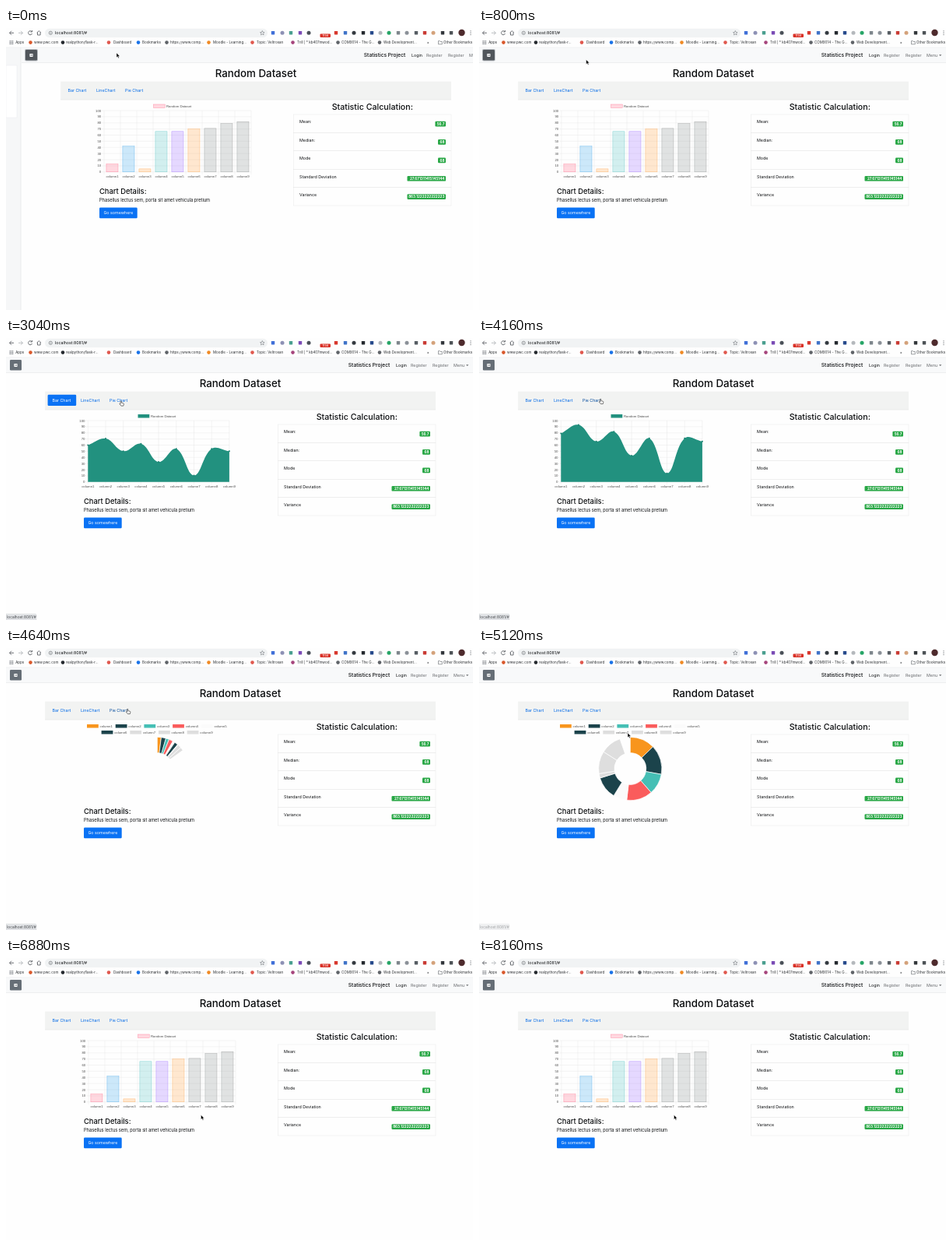
Write an HTML page that moves like this. It is 600x362 px and loops after 8.32 s.

```html
<!DOCTYPE html>
<html lang="en">
<head>
<meta charset="utf-8">
<title>Random Dataset</title>
<style>
  html, body { margin: 0; width: 100%; height: 100%; overflow: hidden; background: #fefefe; }
  svg { display: block; width: 100vw; height: 100vh; }
  text { font-family: Inter, Roboto, sans-serif; font-size: 5.33px; fill: #0c0e10; }
  .h1 { font-size: 13.33px; font-weight: 500; }
  .h2 { font-size: 10.67px; font-weight: 500; }
  .h3 { font-size: 9.33px; font-weight: 500; }
  .body { font-size: 5.68px; }
  .brand { font-size: 6.67px; font-weight: 500; }
  .mute { fill: #67696c; }
  .link { fill: #0069e6; }
  .link.dark { fill: #004a9c; }
  .link.active, .white { fill: #fff; }
  .badge { font-size: 4.55px; font-weight: 700; fill: #fff; text-anchor: end; }
  .chart text { font-family: "Liberation Sans", Arial, sans-serif; font-size: 4.3px; fill: #4a4a4a; }
  .chart .mid { text-anchor: middle; }
  .chart .end { text-anchor: end; }
  .grid { stroke: #e3e4e4; stroke-width: .4; fill: none; }
  .bookmarks text { font-size: 4.5px; fill: #2d3033; }
  .icon { fill: none; stroke: #5f6368; stroke-width: .9; }
</style>
</head>
<body>
<svg viewBox="0 0 600 362" preserveAspectRatio="none">
  <rect width="600" height="362" fill="#fefefe"/>

  <g id="page">
    <rect x="-20" y="25" width="20" height="337" fill="#f6f7f8"/>
    <rect x="-20" y="48" width="14" height="67" fill="#fff" stroke="#e6e7e8" stroke-width=".4"/>
    <path d="M-1.2 25V362" class="grid"/>
    <rect y="25" width="620" height="19.5" fill="#f8f9fa"/>
    <path d="M0 44.5H620" stroke="#dfe1e3" stroke-width=".5"/>
    <rect id="ring" x="4" y="27" width="17" height="15.6" rx="2" fill="#b9bdc1"/>
    <rect id="toggle" x="5" y="28" width="15" height="13.6" rx="1.3"/>
    <rect x="10.4" y="32.9" width="4.2" height="4" rx=".6" fill="#fff"/>
    <path d="M11.2 34.9h2.5m-.9-.9l.9.9-.9.9" fill="none" stroke="#545b62" stroke-width=".6"/>
    <text class="brand" x="439.8" y="37.4">Statistics Project</text>
    <text x="501" y="37.2">Login</text>
    <text class="mute" x="520" y="37.2">Register</text>
    <text class="mute" x="548" y="37.2">Register</text>
    <text class="mute" x="575" y="37.2">Menu</text>
    <path d="M591 34.2h3.4l-1.7 1.8z" fill="#67696c"/>

    <text class="h1" x="301" y="62.6" text-anchor="middle">Random Dataset</text>
    <rect x="50.2" y="68.6" width="501.8" height="23.4" fill="#f2f3f2"/>
    <path d="M50 92H552" stroke="#dcdddd" stroke-width=".5"/>
    <rect id="pill" x="53.6" y="72.8" width="36.6" height="14.2" rx="1.3" fill="#0a72f4"/>
    <text class="link" id="barTab" x="59.5" y="82">Bar Chart</text>
    <text class="link" id="lineTab" x="96" y="82">LineChart</text>
    <text class="link" id="pieTab" x="133" y="82">Pie Chart</text>

    <g class="chart" id="bar"></g>
    <g class="chart" id="line"></g>
    <g class="chart" id="pie"></g>

    <text class="h3" x="100" y="212.6">Chart Details:</text>
    <text class="body" x="100" y="222.5">Phasellus lectus sem, porta sit amet vehicula pretium</text>
    <rect x="100" y="230.5" width="48.7" height="13.7" rx="1.3" fill="#0a72f4"/>
    <text class="white" x="124.4" y="239.4" text-anchor="middle">Go somewhere</text>

    <text class="h2" x="450.8" y="105.3" text-anchor="middle">Statistic Calculation:</text>
    <g id="stats"></g>
  </g>

  <g id="chrome">
    <rect width="600" height="25" fill="#fefefe"/>
    <path d="M0 25H600" stroke="#e4e6e8" stroke-width=".5"/>
    <rect x="50" y=".8" width="286" height="11.4" rx="5.7" fill="#f1f3f4"/>
    <path class="icon" d="M10 6.3H4.6M7 3.8L4.5 6.3 7 8.8"/>
    <path class="icon" d="M16 6.3h5.4M19 3.8l2.5 2.5L19 8.8" style="stroke:#b5b8bb"/>
    <path class="icon" d="M33 4.6A2.5 2.5 0 1 0 33.5 7M33.6 3v2h-2"/>
    <path class="icon" d="M39.6 6.2L42.3 3.7 45 6.2M40.5 5.8V9h3.6V5.8"/>
    <circle class="icon" cx="57.3" cy="6.3" r="2.1" style="stroke-width:.6"/>
    <path class="icon" d="M57.3 6v1.4M57.3 4.9v.5" style="stroke-width:.6"/>
    <text x="63" y="8.3" style="font-size:5.25px">localhost:8081/#</text>
    <path class="icon" d="M329.3 3.5l.8 1.9 2 .2-1.5 1.3.5 2-1.8-1.1-1.8 1.1.5-2-1.5-1.3 2-.2z" style="stroke-width:.5"/>
    <g id="extensions"></g>
    <rect x="403.5" y="7.4" width="13.5" height="4.6" rx="1" fill="#d93025"/>
    <text class="white" x="410.2" y="11.1" text-anchor="middle" style="font-size:4px">1156</text>
    <g class="bookmarks" id="bookmarks"></g>
  </g>

  <g id="status">
    <path d="M0 354.2H37.5q1.5 0 1.5 1.5V362H0z" fill="#e3e5e8" stroke="#c9cccf" stroke-width=".4"/>
    <text x="1.2" y="360.2" style="font-size:4.8px;fill:#44474a">localhost:8081/#</text>
  </g>

  <g id="pointer">
    <path id="arrow" d="M0 0V5.8L1.4 4.6 2.3 6.7 3.3 6.3 2.4 4.2H4.2z" fill="#000" stroke="#fff" stroke-width=".4"/>
    <path id="hand" d="M.6.6Q1.3 0 1.9.7V2.7L4.4 3.3Q5 3.6 4.8 4.6L4.3 6.6H1.4L-.6 4.2Q-.6 3.3.6 4z" fill="#fff" stroke="#111" stroke-width=".55"/>
  </g>
</svg>

<script>
const LOOP = 8320, STEP = 160;
const TOP = 106, BASE = 184.8;
const BAR_START = 5280, LINE_START = 2740, PIE_START = 4600;
const $ = id => document.getElementById(id);
const add = (id, html) => $(id).insertAdjacentHTML('beforeend', html);
const rect = (x, y, w, h, attrs) => `<rect x="${x}" y="${y}" width="${w}" height="${h}" ${attrs}/>`;
const label = (x, y, s, cls = '') => `<text x="${x}" y="${y}" class="${cls}">${s}</text>`;
const yOf = v => BASE - v * (BASE - TOP) / 100;

// Browser extension buttons: x, colour
[[343, '#3f6fd8'], [355, '#8d91b5'], [366, '#4a9f8f'], [378, '#7a4bb5'], [389, '#4a5058'],
 [424, '#d8382e'], [436, '#3f73c8'], [447, '#343a40'], [459, '#24292e'], [470, '#274a8c'],
 [481, '#b4b8bc'], [492, '#27a567'], [504, '#7e868c'], [515, '#8b9198'], [527, '#565d63'],
 [538, '#c93b34'], [549, '#d4a27b'], [561, '#33373b'], [572, '#4d5256']
].forEach(([x, c], i) => add('extensions', i % 3 == 1 || x == 492
  ? `<circle cx="${x}" cy="6.2" r="2.5" fill="${c}"/>`
  : rect(x - 2.2, 4, 4.4, 4.4, `rx=".6" fill="${c}"`)));
add('extensions', '<circle cx="585.5" cy="6" r="4.2" fill="#4d2a2c"/>');
for (const y of [3.8, 6.2, 8.6]) add('extensions', `<circle cx="597" cy="${y}" r=".6" fill="#5f6368"/>`);

// Bookmarks: icon x, colour, caption x, caption
[[31.5, '#d9582b', 36, 'www.pwc.com'], [73, '#24292e', 77, 'realpython/flask-r...'],
 [132, '#e0584e', 138, 'Dashboard'], [170, '#1a73e8', 175, 'Bookmarks'],
 [206.5, '#5f6368', 211, 'https://www.comp...'], [260.5, '#f08a24', 266, 'Moodle - Learning...'],
 [316.5, '#e0584e', 322, 'Topic: Veltrosan'], [368.5, '#a6447c', 374, 'Trill | * kb407mwod...'],
 [426.5, '#5f6368', 431, 'COM9014 - The G...'], [480, '#5f6368', 485, 'Web Development...']
].forEach(([x, c, tx, s]) => add('bookmarks',
  `<circle cx="${x}" cy="18.6" r="2.3" fill="${c}"/>` + label(tx, 20.3, s)));
for (let i = 0; i < 9; i++)
  add('bookmarks', rect(4.5 + i % 3 * 1.8, 16.2 + (i / 3 | 0) * 1.8, 1.2, 1.2, 'fill="#7b7f84"'));
add('bookmarks', label(12.2, 20.3, 'Apps') + label(541, 20.3, '»') + label(562, 20.3, 'Other Bookmarks') +
  '<path class="icon" d="M555.5 16.6h1.8l.6.8h2.4v3.4h-4.8z" style="stroke-width:.6"/>');

// Statistics list
[['Mean:', '56.7', 13.6], ['Median:', '68', 10], ['Mode', '68', 10],
 ['Standard Deviation', '27.671311415145144', 49.5], ['Variance', '863.1222222222223', 49.5]
].forEach(([name, value, w], i) => {
  const y = 111 + i * 23.4;
  add('stats', rect(349.5, y, 202.5, 23.4, 'class="grid"') + label(357, y + 11.4, name) +
    rect(545 - w, y + 8.7, w, 6.7, 'rx="1.2" fill="#28a745"') + label(543.4, y + 13.7, value, 'badge'));
});

// Axes shared by the bar and line charts
function axes(id, left, right, step) {
  let d = '', s = '';
  for (let v = 0; v <= 100; v += 10) {
    d += `M${left - 3.3} ${yOf(v)}H${right}`;
    s += label(left - 3.8, yOf(v) + 1.5, v, 'end');
  }
  for (let x = left; x < right + 1; x += step) d += `M${x} ${TOP}V${BASE + 3.3}`;
  add(id, `<path class="grid" d="${d}"/>` + s);
}
const legend = (id, attrs) => add(id, rect(169.5, 98, 14.8, 4.5, attrs) + label(186, 102, 'Random Dataset'));

// Bar chart
const barValues = [13, 42, 5, 66, 66, 70, 71, 79, 82];
const barColors = ['#ff6384', '#36a2eb', '#ff9f40', '#4bc0c0', '#9966ff', '#ff9f40', '#858b8b', '#858b8b', '#858b8b'];
const tint = c => `fill="${c}" fill-opacity=".25" stroke="${c}" stroke-width=".45" stroke-opacity=".7"`;
axes('bar', 106, 295, 21);
legend('bar', tint(barColors[0]));
barValues.forEach((v, i) => add('bar',
  rect(108.9 + 21 * i, 0, 15.1, 0, 'class="col" ' + tint(barColors[i])) +
  label(116.5 + 21 * i, 192.3, 'column' + (i + 1), 'mid')));
add('bar', '<path id="tip" d="M179.5 132.5l2-1.5V126.5q0-1 1-1H230q1 0 1 1V138.5q0 1-1 1H182.5q-1 0-1-1V134z" fill="#000"/>');
const cols = document.querySelectorAll('.col');

function drawBars(k) {
  cols.forEach((c, i) => {
    const y = yOf(barValues[i] * k);
    c.setAttribute('y', y);
    c.setAttribute('height', BASE - y);
  });
}

// Line chart
const values = [79, 93, 66, 82, 43, 71, 14, 71, 66];
const TEAL = '#22917f';
axes('line', 105.3, 287, 22.7);
legend('line', `fill="${TEAL}"`);
add('line', `<path id="area" fill="${TEAL}"/><path id="dots" fill="none" stroke="#1b8271" stroke-width="2" stroke-linecap="round"/>`);
values.forEach((v, i) => add('line', label(105.3 + 22.7 * i, 192.3, 'column' + (i + 1), 'mid')));

function drawLine(k) {
  const pts = values.map((v, i) => [105.3 + 22.7 * i, yOf(v * k)]);
  const dist = (a, b) => Math.hypot(a[0] - b[0], a[1] - b[1]);
  const clampY = y => Math.min(BASE, Math.max(TOP, y));
  const handles = pts.map((p, i) => {
    const a = pts[i - 1] || p, b = pts[i + 1] || p;
    const da = dist(a, p), db = dist(p, b);
    const at = f => [p[0] + f * (b[0] - a[0]), clampY(p[1] + f * (b[1] - a[1]))];
    return { before: at(-.4 * da / (da + db)), after: at(.4 * db / (da + db)) };
  });
  let d = `M${pts[0]}`;
  for (let i = 1; i < pts.length; i++) d += `C${handles[i - 1].after} ${handles[i].before} ${pts[i]}`;
  $('area').setAttribute('d', d + `V${BASE}H${pts[0][0]}Z`);
  $('dots').setAttribute('d', pts.map(p => `M${p}h.01`).join(''));
}

// Doughnut chart
const sliceColors = ['#f8951d', '#1b434b', '#45bfb5', '#fa5c5c', '#fbfbfb', '#1b434b', '#dedede', '#dedede', '#dedede'];
sliceColors.forEach((c, i) => {
  const x = i < 5 ? 104 + 36.7 * i : 122.6 + 36.7 * (i - 5), y = i < 5 ? 98 : 106;
  add('pie', `<path class="slice" fill="${c}" stroke="#fff" stroke-width=".7"/>` +
    rect(x, y, 14.8, 4.5, `fill="${c}"`) + label(x + 16.6, y + 4, 'column' + (i + 1)));
});
const slices = document.querySelectorAll('.slice');
const total = values.reduce((a, b) => a + b);

function drawPie(k) {
  const at = (r, a) => `${194.3 + r * Math.sin(a)} ${155 - r * Math.cos(a)}`;
  let a = 0;
  slices.forEach((s, i) => {
    const b = a + values[i] / total * 2 * Math.PI * k;
    s.setAttribute('d', `M${at(40.6, a)}A40.6 40.6 0 0 1 ${at(40.6, b)}L${at(20.4, b)}A20.4 20.4 0 0 0 ${at(20.4, a)}Z`);
    a = b;
  });
}

// Pointer stops: time, x, y
const path = [[0, 142, 32], [480, 142, 32], [1760, 114.5, 87.5], [1920, 114.5, 87.5], [2400, 112, 80],
  [2720, 112, 80], [3040, 146.5, 80.5], [4160, 155, 78], [4640, 155, 78], [5120, 191, 109],
  [5280, 82, 80], [5600, 82, 80], [5920, 178, 140], [6720, 250.5, 201.5], [LOOP, 250.5, 201.5]];
const clamp = x => Math.min(1, Math.max(0, x));
const grow = (t, start, length = 1000) => 1 - (1 - clamp((t - start) / length)) ** 4;
const within = (t, a, b) => t >= a && t < b;
const show = (id, on) => $(id).style.display = on ? '' : 'none';

function pointerAt(t) {
  const i = path.findIndex(p => p[0] > t), a = path[i - 1], b = path[i];
  const u = (t - a[0]) / (b[0] - a[0]), e = u * u * (3 - 2 * u);
  return [a[1] + (b[1] - a[1]) * e, a[2] + (b[2] - a[2]) * e];
}

function render(t) {
  const onLine = within(t, LINE_START, PIE_START), onPie = within(t, PIE_START, BAR_START);
  const focused = t < LINE_START;
  $('page').setAttribute('transform', `translate(${t < STEP ? 20 : 0})`);
  $('toggle').setAttribute('fill', focused ? '#51565b' : '#666e76');
  show('ring', focused);

  show('line', onLine);
  show('pie', onPie);
  show('bar', !onLine && !onPie);
  if (onLine) drawLine(grow(t, LINE_START));
  else if (onPie) drawPie(grow(t, PIE_START));
  else drawBars(t < BAR_START ? 1 : grow(t, BAR_START, 640));

  const pill = within(t, LINE_START, 3360);
  show('pill', pill);
  $('barTab').classList.toggle('active', pill);
  $('lineTab').classList.toggle('dark', within(t, 2240, LINE_START) || within(t, 5760, 6080));
  $('pieTab').classList.toggle('dark', within(t, 3200, 4800));
  $('tip').style.opacity = within(t, 5840, 6240) ? .25 : 0;
  $('status').style.opacity = t < 2400 ? 0 : clamp((5280 - t) / 320);

  const hand = within(t, 2240, 4800) || within(t, 5280, 5700);
  $('pointer').setAttribute('transform', `translate(${pointerAt(t)})`);
  show('pointer', !within(t, 5840, 6080));
  show('hand', hand);
  show('arrow', !hand);
}

function tick() {
  const t = performance.now() % LOOP;
  render(Math.floor(t / STEP) * STEP);
  requestAnimationFrame(tick);
}
tick();
</script>
</body>
</html>
```
